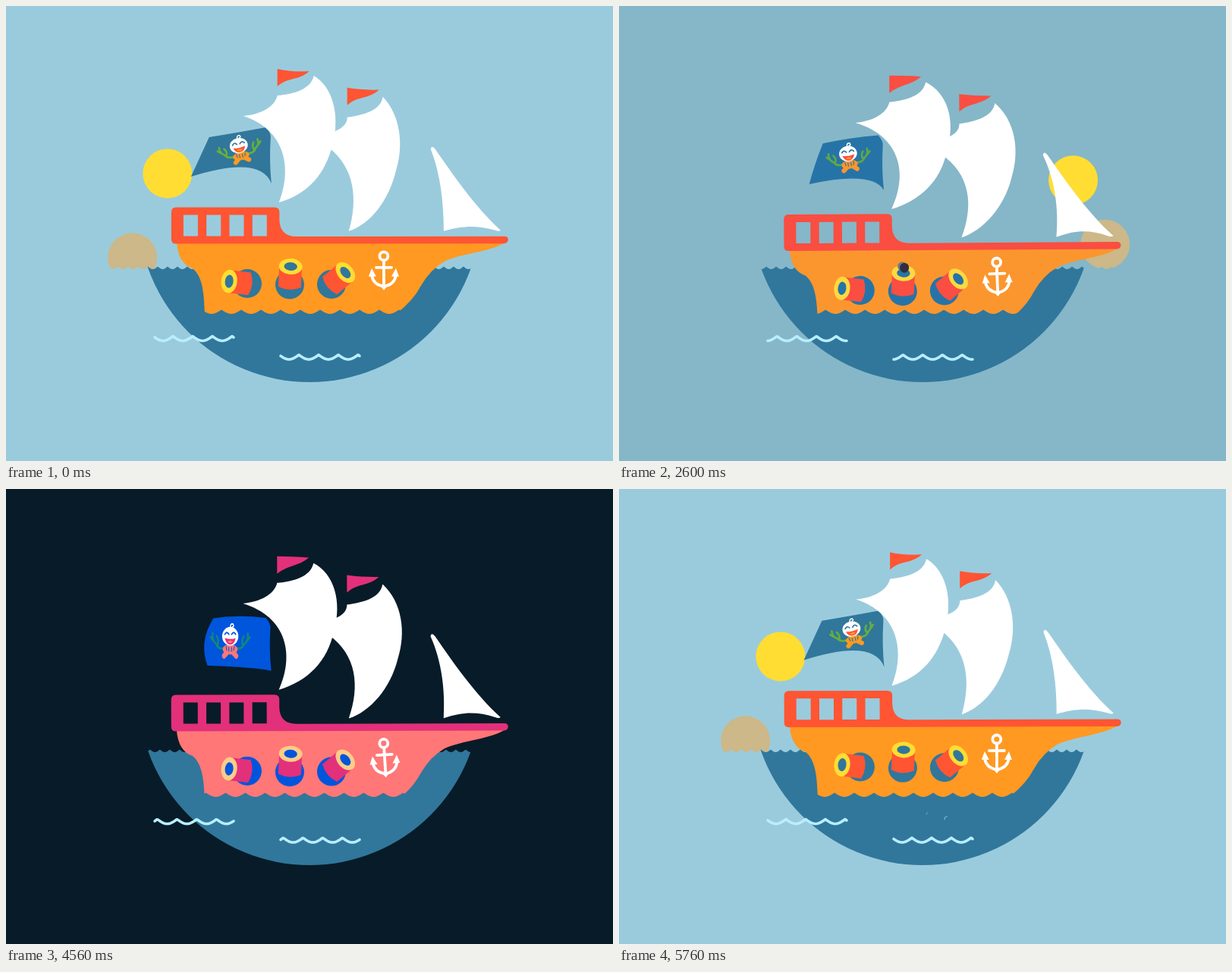
Write an HTML page with a canvas that moves like this. It is 800 by 600 pixels and loops after 5800 ms.

```html
<!DOCTYPE html>
<html lang="en">
<head>
<meta charset="utf-8">
<title>Pirate ship</title>
<style>
html, body { margin: 0; width: 100%; height: 100%; overflow: hidden; background: #9acbdd; }
canvas { display: block; }
</style>
</head>
<body>
<canvas id="stage" width="800" height="600"></canvas>
<script>
const c = document.getElementById('stage').getContext('2d');
const LOOP = 5800, TURN = 5760, ROCK = LOOP / 3, TAU = 2 * Math.PI, RAD = Math.PI / 180;
const SEA = '#30779b';

// time, heave of the ship, swing of the anchor, flutter of the flag
const poses = [
  [0, 0, 0, 0], [1000, 10.6, 10, .1], [2000, 6, 0, .2], [3000, 10.6, -3, .35],
  [3600, 10.4, -10, .55], [5200, 3.4, 0, 1], [TURN, .5, 0, 0], [LOOP, 0, 0, 0]
];
// day, dusk, night, dawn
const tints = {
  sky: ['9acbdd', '336677', '081b28', '446d77'],
  hull: ['ff9922', 'ec8860', 'ff7777', 'ec8860'],
  rail: ['ff5533', 'e3307a', 'e3307a', 'ff5533'],
  flag: ['30779b', '0066d5', '0055dd', '0669b8'],
  rim: ['ffdd33', 'fccb77', 'ffcc88', 'edc93c'],
  weed: ['66b03c', '448f60', '118877', '229966']
};
// time, column of the tints
const hours = [[0, 0], [2500, 0], [3000, 1], [3400, 2], [4840, 2], [5200, 3], [5560, 0], [LOOP, 0]];
const shots = [
  { from: [447, 352], to: [555, 409], time: 400, starts: [620] },
  { from: [295, 370], to: [265, 410], time: 190, starts: [930, 930 + ROCK] },
  { from: [376, 345], to: [410, 409], time: 295, starts: [2600, 4950] }
];

// The two keys around a time, and how far it lies between them
function between(keys, t) {
  let i = 0;
  while (keys[i + 1][0] <= t) i++;
  const a = keys[i], b = keys[i + 1];
  return [a, b, (t - a[0]) / (b[0] - a[0])];
}

function poseAt(t) {
  const [a, b, u] = between(poses, t), s = u * u * (3 - 2 * u);
  const [, heave, swing, flutter] = a.map((x, i) => x + (b[i] - x) * s);
  const rock = TAU * (t / ROCK - .535);
  return { heave, swing, flutter, roll: .95 * (Math.cos(rock) + Math.cos(2 * rock)) };
}

function coloursAt(t) {
  const [[, a], [, b], u] = between(hours, t);
  const part = (h, k) => parseInt(h.slice(k, k + 2), 16);
  const mix = h => `rgb(${[0, 2, 4].map(k => Math.round(part(h[a], k) * (1 - u) + part(h[b], k) * u))})`;
  return Object.fromEntries(Object.entries(tints).map(([name, h]) => [name, mix(h)]));
}

function shape(d, fill, rule = 'nonzero') {
  c.fillStyle = fill;
  c.fill(new Path2D(d), rule);
}
function line(d, colour, width) {
  c.strokeStyle = colour;
  c.lineWidth = width;
  c.lineCap = c.lineJoin = 'round';
  c.stroke(new Path2D(d));
}
function oval(x, y, rx, ry, fill) {
  c.beginPath();
  c.ellipse(x, y, rx, ry, 0, 0, TAU);
  c.fillStyle = fill;
  c.fill();
}
function group(draw, x = 0, y = 0, turn = 0, sx = 1, sy = 1) {
  c.save();
  c.translate(x, y);
  c.rotate(turn * RAD);
  c.scale(sx, sy);
  draw();
  c.restore();
}

// Crested water line; it drifts left by one crest per loop
function crests(x0, x1, top, height, period, peak, t) {
  let d = '';
  for (let x = x0; x <= x1; x++) {
    const a = Math.PI * ((x - peak) / period + t / TURN);
    d += `${d ? 'L' : 'M'}${x} ${top + height * Math.abs(Math.sin(a))}`;
  }
  return d;
}
const horizon = t => crests(0, 800, 343.5, 3.5, 13, 187, t);
const waterline = t => crests(0, 800, 400.5, 5.5, 26, 284, t);

function clipped(d, draw) {
  c.save();
  c.clip(new Path2D(d));
  draw();
  c.restore();
}

function orbit(t, start, cy, r, draw) {
  const a = (start + t / TURN * 360) * RAD;
  group(draw, 405 + r * Math.cos(a), cy + r * Math.sin(a));
}

function heavens(t) {
  clipped(horizon(t) + 'V0H0Z', () => {
    orbit(t, 186.6, 359.5, 240, () => oval(0, 0, 32.5, 32.5, '#ccb888'));
    orbit(t, 190, 255, 195.2, () => oval(0, 0, 32.5, 32.5, '#ffdd33'));
    orbit(t, 9.8, 360, 202, () => shape('M6-32A32.5 32.5 0 1 0 6 32A40 40 0 0 1 6-32Z', '#d8dad9'));
  });
}

function sea(t) {
  clipped(horizon(t) + 'V600H0Z', () => oval(400, 270.3, 225.7, 225.7, SEA));
}

function sails(b) {
  shape(`M313 145C335 143 354 134 358 118C380 116 402 110 406 92
    C${430 + b} 106 ${441 + b} 142 ${431 + b * .6} 182C${421 + b} 222 398 248 360 259
    C${378 + b} 213 ${368 + b} 163 313 145Z`, '#fff');
  shape(`M426 187L434 165Q450 159 450 147C472 144 494 138 497 120
    C${520 + b} 144 ${525 + b} 184 ${514 + b} 218C${504 + b} 258 480 288 452 297
    C${464 + b} 255 ${460 + b} 214 426 187Z`, '#fff');
  shape(`M560 189Q561 183 566 189C588 221 618 265 652 296Q650 298 645 296
    C620 ${289 - b * .4} 602 ${290 - b * .4} 577 297C${577 + b * .8} 260 ${573 + b * .6} 222 560 189Z`, '#fff');
}

function pennant(x, y, t, fill) {
  const w = Math.cos(2 * TAU * t / ROCK);
  shape(`M${x} ${y + 1}C${x + 14} ${y + 2 + w * 2} ${x + 28} ${y + 2 + w * 3} ${x + 42} ${y + 3 + w}
    C${x + 28} ${y + 15 + w * 2} ${x + 14} ${y + 12 - w} ${x} ${y + 24}Z`, fill);
}

function emblem(k) {
  for (const side of [-1, 1]) {
    group(() => line('M10 13Q18 14 21 8Q27 5 26-3M19 10Q16 5 20 0M26 4l3-3', k.weed, 2.6), 0, 0, 0, side, 1);
    line(`M0 14L${side * 9} 21`, k.hull, 6);
  }
  oval(0, 14, 11, 5.5, k.hull);
  line('M-6 11l1 4M-2 12v4M2 12v4M6 11l-1 4', k.flag, 1.2);
  oval(0, 0, 12, 10, '#fff');
  line('M0-9Q0-14 4-13Q6-10 3-10', '#fff', 1.5);
  line('M-8-2Q-5-6-2-2M2-2Q5-6 8-2', k.flag, 1.7);
  shape('M-8 2Q0 4 8 2Q6 9 0 9Q-6 9-8 2Z', k.rail);
  shape('M-4 6Q0 3 4 6Q0 9-4 6Z', k.hull);
}

function flag(f, k) {
  const bulge = 11 * f * f;
  const left = 268 + 7 * f, top = 173 - 12 * f * f, right = 160 + 5 * f;
  const foot = 244 + 26 * f, base = 225 + 2 * f;
  shape(`M${left} ${top}Q305 ${167 - 9 * f} 343 ${right}Q350 ${right + 8} 349 ${right + 14}
    Q347 205 350 234Q335 ${196 + 40 * f} ${foot} ${base}
    Q${(left + foot) / 2 - 2 * bulge} ${(top + base) / 2} ${left} ${top}Z`, k.flag);
  group(() => emblem(k), 307 - 13 * f, 184 + 5 * f, 16 * f - 13, 1 - bulge * .014, 1 + bulge * .03);
}

function cannon(x, y, turn, k) {
  oval(x, y, 19, 19, k.flag);
  group(() => {
    shape('M-15-24L-15 3Q0 10 15 3L15-24Z', k.rail);
    oval(0, -24, 15.5, 10.5, k.rim);
    oval(0, -24, 8.7, 5.5, k.flag);
  }, x, y, turn);
}

function anchor(swing) {
  group(() => {
    line('M5.5 0A5.5 5.5 0 1 1-5.5 0A5.5 5.5 0 1 1 5.5 0M0 6V40M-10 15H10M-16 25Q-14 38 0 40Q14 38 16 25', '#fff', 3.8);
    shape('M-20 27L-16 16L-10 27ZM20 27L16 16L10 27ZM-5 39H5L0 45Z', '#fff');
  }, 498, 330, swing);
}

function ship(t, k) {
  const { heave, swing, flutter, roll } = poseAt(t);
  const afloat = draw => group(() => {
    c.translate(-330, -395);
    draw();
  }, 330, 395 + heave, roll);

  clipped(waterline(t) + 'V0H0Z', () => afloat(() =>
    shape(`M225 311Q227 340 246 346C260 358 262 380 262 425H485Q531 400 547 369
      Q559 348 578 337C602 326 640 325 660 311Z`, k.hull)));

  afloat(() => {
    flag(flutter, k);
    sails(heave / 2);
    pennant(358, 82, t, k.rail);
    pennant(450, 107, t + 120, k.rail);
    const windows = [0, 1, 2, 3].map(i => `M${234 + 30.3 * i} 275.5h19v28h-19Z`).join('');
    shape(`M224 265.5H354Q360.5 265.5 360.5 272V282Q361 304 383 304H657Q662 304 662 309
      Q661 313.5 656 313.5H224Q218 313.5 218 307V272Q218 265.5 224 265.5Z` + windows, k.rail, 'evenodd');
    cannon(318, 366, -83, k);
    cannon(374, 367.5, 3, k);
    cannon(429, 367, 50, k);
    anchor(swing);
  });
}

function foam(x, y, t) {
  line(crests(x, x + 104, y, 6, 26, x + 24, t), '#b8eeff', 3.6);
}

function bubble(x, y, r) {
  oval(x, y, r, r, SEA);
  c.beginPath();
  c.arc(x, y, r, 2.6, 5);
  c.strokeStyle = '#9bd3e3';
  c.lineWidth = Math.min(2, r / 3);
  c.stroke();
}

function ball(u, [x0, y0], [x1, y1]) {
  const x = x0 + (x1 - x0) * u, r = 6 + 6 * u;
  const y = y0 + (y1 - y0) * u - Math.abs(x1 - x0) * .3 * u * (1 - u);
  oval(x - 3 * Math.sign(x1 - x0), y - 2, r, r, '#777b80');
  oval(x, y, r, r * 1.08, '#332d41');
  if (u > .9) bubble(x1 - 2, y1 + 9, 9);
}

// s runs from the ball's landing to the last bubble
function splash(s, x, y, side) {
  const q = 1 - (s / .32) ** 2;
  if (q > 0) {
    oval(x - 5, y - 12, 14 * q, 13 * q, '#5e9fb2');
    oval(x - 9, y - 20 - 35 * s, 6 * q, 6 * q, '#5e9fb2');
  }
  const r = 11 * (1 - s) + .8;
  bubble(x - 10 + 38 * side * s, y + 2 + 34 * s * s, r);
  bubble(x + 5 - 10 * side * s, y + 6 + 16 * s, r * .6);
}

function shoot(t, { from, to, time, starts }) {
  for (const start of starts) {
    const u = (t - start) / time, s = (t - start - time) / 620;
    if (u >= 0 && u < 1) ball(u, from, to);
    else if (s >= 0 && s < 1) splash(s, ...to, Math.sign(to[0] - from[0]));
  }
}

const begin = performance.now();
function draw() {
  const t = (performance.now() - begin) % LOOP, k = coloursAt(t);
  c.fillStyle = k.sky;
  c.fillRect(0, 0, 800, 600);
  heavens(t);
  sea(t);
  ship(t, k);
  foam(196, 435.5, t);
  foam(362, 460, t);
  for (const s of shots) shoot(t, s);
  requestAnimationFrame(draw);
}
draw();
</script>
</body>
</html>
```
